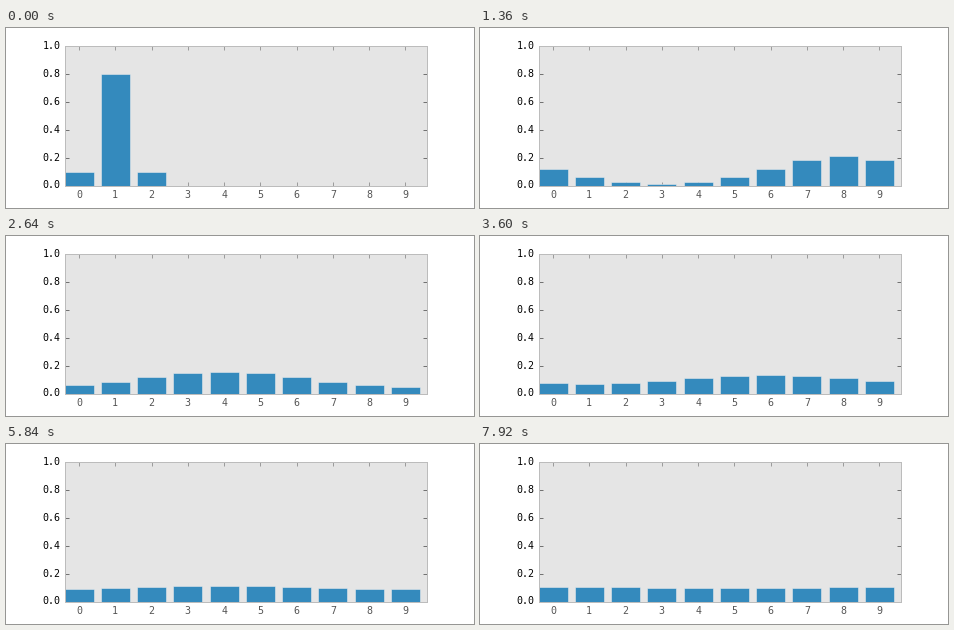
These frames come from a looping animation (468 by 180 pixels, 8 s). A matplotlib script:

```python
import numpy as np
import matplotlib.pyplot as plt
from matplotlib.animation import FuncAnimation

CELLS = 10
FRAMES = 100
KERNEL = {-1: 0.1, 0: 0.8, 1: 0.1}

plt.rcParams.update({
    "font.family": "DejaVu Sans Mono",
    "font.size": 10,
    "axes.axisbelow": True,
})


def predict(belief):
    """Move one cell to the right on a ring, with an uncertain step."""
    return sum(p * np.roll(belief, 1 + k) for k, p in KERNEL.items())


def belief_at(step):
    belief = np.eye(CELLS)[0]
    for _ in range(step):
        belief = predict(belief)
    return belief


fig = plt.figure(figsize=(6.5, 2.5), dpi=72, facecolor="white")
ax = fig.add_axes([0.125, 0.125, 0.775, 0.775], facecolor="#E5E5E5")
ax.set_xlim(-0.4, CELLS - 0.4)
ax.set_ylim(0, 1)
ax.set_xticks(range(CELLS))
ax.set_yticks(np.linspace(0, 1, 6))

ax.tick_params(direction="in", length=4, width=0.5, pad=4,
               top=True, right=True)
ax.tick_params(axis="x", colors="#555555")
ax.tick_params(axis="y", colors="black")
for label in ax.get_yticklabels():
    label.set_va("center")
for spine in ax.spines.values():
    spine.set(color="#BCBCBC", linewidth=1)

bars = ax.bar(range(CELLS), belief_at(1), width=0.8, color="#348ABD",
              edgecolor="#EEEEEE", linewidth=0.5)


def update(frame):
    for bar, p in zip(bars, belief_at(frame + 1)):
        bar.set_height(p)
    return bars


anim = FuncAnimation(fig, update, frames=FRAMES, interval=80,
                     repeat=True, repeat_delay=0)
plt.show()
```
